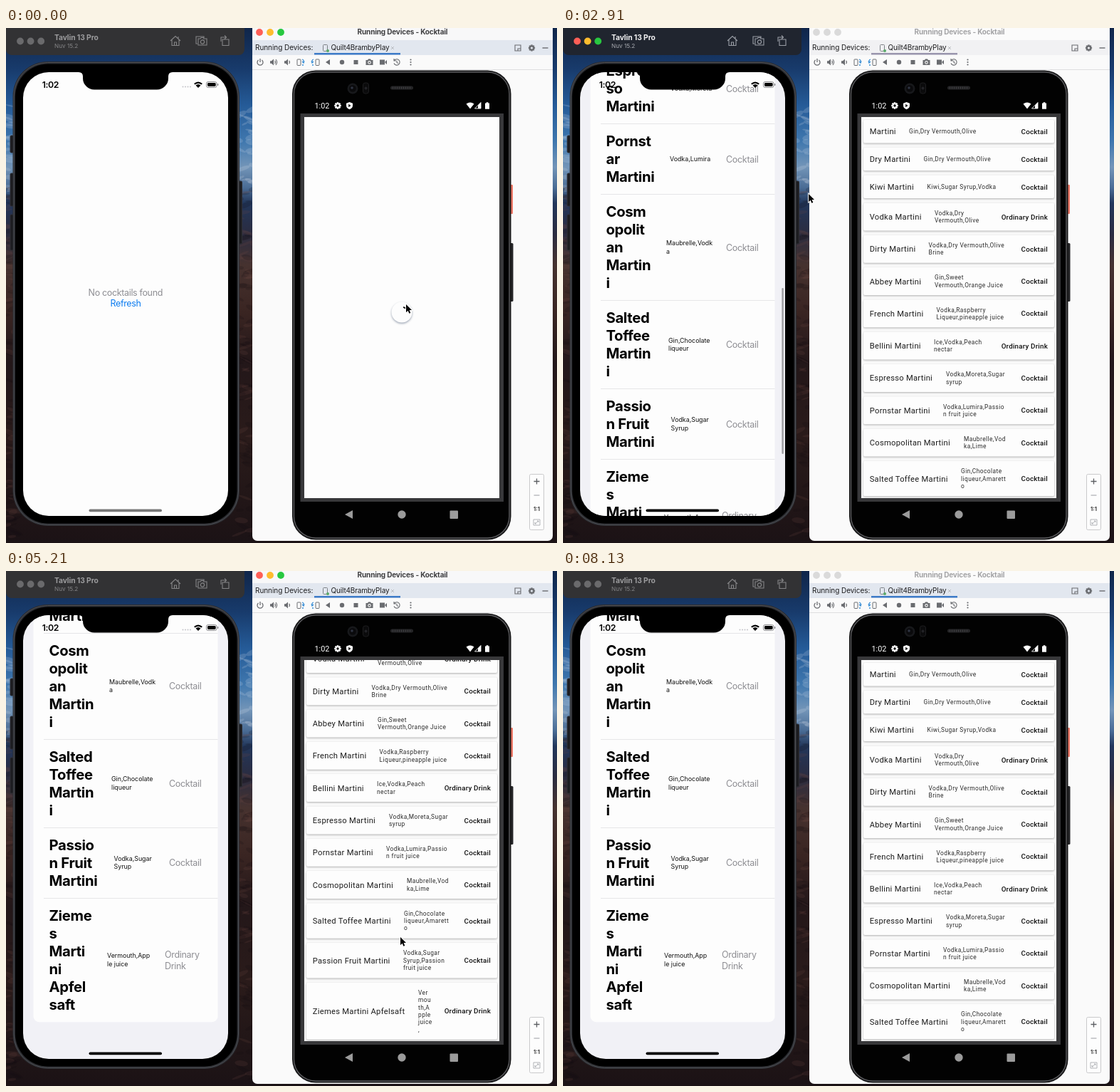
These frames come from a looping animation (774x723 px, 8.15 s). An HTML page with a canvas:

```html
<!DOCTYPE html>
<html lang="en">
<head>
<meta charset="utf-8">
<title>Cocktail lists on two phones</title>
<style>
html, body { margin: 0; width: 100%; height: 100%; overflow: hidden; background: #1c1418; }
canvas { display: block; }
</style>
</head>
<body>
<canvas id="stage" width="774" height="723"></canvas>
<script>
const W = 774, H = 723, LOOP = 8150, STEP = 208.4;
const ctx = document.getElementById('stage').getContext('2d');
const UI = 'Inter, "Liberation Sans", sans-serif';
const DROID = 'Roboto, "Liberation Sans", sans-serif';

// left name, left ingredients, x, right name, right ingredients, x, ordinary drink
const DRINKS = [
  ['Martin/i', 'Gin,Dry/Vermouth', 156, 'Martini', 'Gin,Dry Vermouth,Olive', 486],
  ['Dry/Martini', 'Gin,Dry/Vermouth', 158.5, 'Dry Martini', 'Gin,Dry Vermouth,Olive', 506.5],
  ['Kiwi/Martini', 'Kiwi,Sugar/Syrup', 156, 'Kiwi Martini', 'Kiwi,Sugar Syrup,Vodka', 511.5],
  ['Vodka/Martini', 'Vodka,Dry/Vermouth', 153, 'Vodka Martini', 'Vodka,Dry/Vermouth,Olive', 522, 1],
  ['Dirty/Martini', 'Vodka,Dry/Vermouth', 156, 'Dirty Martini', 'Vodka,Dry Vermouth,Olive/Brine', 513.5],
  ['Abbey/Martini', 'Gin,Sweet/Vermouth', 157, 'Abbey Martini', 'Gin,Sweet/Vermouth,Orange Juice', 522],
  ['Frenc/h/Martin/i', 'Vodka,Raspber/ry Liqueur', 146, 'French Martini', 'Vodka,Raspberry/Liqueur,pineapple juice', 524.5],
  ['Bellini/Martini', 'Ice,Vodka,/Peach nectar', 150, 'Bellini Martini', 'Ice,Vodka,Peach/nectar', 521, 1],
  ['Espres/so/Martini', 'Vodka,Moreta', 151, 'Espresso Martini', 'Vodka,Moreta,Sugar/syrup', 538],
  ['Pornst/ar/Martini', 'Vodka,Lumira', 150, 'Pornstar Martini', 'Vodka,Lumira,Passio/n fruit juice', 534],
  ['Cosm/opolit/an/Martin/i', 'Maubrelle,Vodk/a', 145, 'Cosmopolitan Martini', 'Maubrelle,Vod/ka,Lime', 563],
  ['Salted/Toffee/Martin/i', 'Gin,Chocolate/liqueur', 148, 'Salted Toffee Martini', 'Gin,Chocolate/liqueur,Amarett/o', 559],
  ['Passio/n Fruit/Martini', 'Vodka,Sugar/Syrup', 151.5, 'Passion Fruit Martini', 'Vodka,Sugar/Syrup,Passion/fruit juice', 558],
  ['Zieme/s/Marti/ni/Apfel/saft', 'Vermouth,App/le juice', 142, 'Ziemes Martini Apfelsaft', 'Ver/mou/th,A/pple/juice/,', 579, 1]
];

// Motion keys: [step, values...]
const POINTER = [[0, 562, 388], [1, 520, 392], [3, 290, 394], [5, 170, 384], [7, 172, 384],
  [9, 188, 455], [10, 188, 455], [11, 195, 340], [12, 235, 275], [14, 345, 233], [16, 470, 400],
  [18, 542, 506], [19, 545, 500], [21, 548, 370], [22, 550, 365], [24, 553, 500], [25, 554, 514],
  [26, 554, 516], [29, 558, 620], [31, 561, 664], [33, 561, 664], [36, 752, 518], [37, 800, 518]];
const LEFT_SCROLL = [[10, 0], [11, 120], [12, 390], [13, 620], [14, 786], [15, 865], [16, 905], [17, 925], [18, 933], [19, 932.4]];
const BAR = [[10, 95, 307], [12, 230, 250], [14, 365, 233], [18, 420, 232]];
const BAR_ALPHA = [[8, 0], [9, 1], [21, 1], [25, 0]];
const RIGHT_SCROLL = [[18, 0], [19, 8], [21, 125], [22, 141.5], [26, 141.5], [27, 124], [28, 84], [29, 38], [30, 8], [31, 0]];

function at(keys, s) {
  if (s <= keys[0][0]) return keys[0].slice(1);
  for (let i = 1; i < keys.length; i++) {
    const a = keys[i - 1], b = keys[i];
    if (s <= b[0]) {
      const k = (s - a[0]) / (b[0] - a[0]);
      return a.slice(1).map((v, j) => v + (b[j + 1] - v) * k);
    }
  }
  return keys[keys.length - 1].slice(1);
}

function rect(x, y, w, h, color) {
  ctx.fillStyle = color;
  ctx.fillRect(x, y, w, h);
}
function round(x, y, w, h, r, color, line, weight = 1) {
  ctx.beginPath();
  ctx.roundRect(x, y, w, h, r);
  if (color) { ctx.fillStyle = color; ctx.fill(); }
  if (line) { ctx.strokeStyle = line; ctx.lineWidth = weight; ctx.stroke(); }
}
function dot(x, y, r, color) {
  ctx.beginPath();
  ctx.arc(x, y, r, 0, 7);
  ctx.fillStyle = color;
  ctx.fill();
}
function text(s, x, y, font, color, gap = 0, align = 'left') {
  ctx.font = font;
  ctx.letterSpacing = gap + 'px';
  ctx.textAlign = align;
  ctx.fillStyle = color;
  ctx.fillText(s, x, y);
}
function lines(s, x, mid, lead, shift, font, color, gap) {
  const parts = s.split('/');
  parts.forEach((p, i) =>
    text(p, x, mid + (i - (parts.length - 1) / 2) * lead + shift, font, color, gap));
}
function icon(d, x, y, color, weight = 1.1) {
  ctx.save();
  ctx.translate(x, y);
  const p = new Path2D(d);
  if (weight) { ctx.strokeStyle = color; ctx.lineWidth = weight; ctx.stroke(p); }
  else { ctx.fillStyle = color; ctx.fill(p); }
  ctx.restore();
}
function clipped(x, y, w, h, r, draw) {
  ctx.save();
  ctx.beginPath();
  ctx.roundRect(x, y, w, h, r);
  ctx.clip();
  draw();
  ctx.restore();
}
function gradient(x0, y0, x1, y1, stops) {
  const g = ctx.createLinearGradient(x0, y0, x1, y1);
  stops.forEach(([p, c]) => g.addColorStop(p, c));
  return g;
}
function lights(x, y, gap, on, off) {
  ['#fe5f57', '#febc2e', '#28c840'].forEach((c, i) => dot(x + i * gap, y, 4.9, on ? c : off));
}

function wallpaper() {
  rect(0, 0, W, H, gradient(0, 0, 0, H, [
    [0, '#10264a'], [.08, '#183b6c'], [.15, '#255b98'], [.22, '#3f77ae'], [.27, '#7395b8'],
    [.31, '#4a6c95'], [.34, '#22365a'], [.4, '#2b2c40'], [.46, '#46322f'], [.55, '#3a2522'],
    [.65, '#231719'], [.8, '#2a1b1a'], [1, '#1b1215']]));
  let seed = 17;
  const rnd = () => (seed = seed * 16807 % 2147483647) / 2147483647;
  for (let i = 0; i < 200; i++) {
    const y = 110 + rnd() * 613, x = rnd() < .5 ? rnd() * 12 : 326 + rnd() * 22;
    const sky = y < 225;
    ctx.globalAlpha = .18;
    ctx.beginPath();
    ctx.ellipse(x, y, 4 + rnd() * 9, 1 + rnd() * 3, rnd() - .5, 0, 7);
    ctx.fillStyle = sky ? '#dbe6ef' : rnd() < .6 ? '#120c10' : '#704a40';
    ctx.fill();
  }
  ctx.globalAlpha = 1;
}

function leftBar(on) {
  round(0, -10, 335, 48, 8, on ? '#20252f' : '#323234');
  lights(20, 18.5, 14.6, on, '#6a6a6c');
  text('Tavlin 13 Pro', 68, 17, '700 10.3px ' + UI, on ? '#f1f1f2' : '#9c9c9e', -.1);
  text('Nuv 15.2', 68, 27.5, '400 8.2px ' + UI, on ? '#a8abb1' : '#858587');
  const c = on ? '#9a9ea6' : '#858587';
  icon('M-7 0L0-6.5L7 0M-5-1.5V6.5H5V-1.5M-1.5 6.5V2H1.5V6.5M4-6V-3', 238, 18, c);
  icon('M-5 4H-7V-6H4V-4M-4-3H-1L0-4.5H3L4-3H8V6H-4ZM4.6 1.5A2.6 2.6 0 1 1 -.6 1.5A2.6 2.6 0 1 1 4.6 1.5', 274, 18, c);
  icon('M-4-2H5V6.5H-4ZM-6 1V-5H1M-1-7.5L1.5-5L-1-2.5', 308, 18, c);
}

function leftList(s) {
  const [off] = at(LEFT_SCROLL, s);
  rect(24, 62, 288, 623, '#f1f1f6');
  const height = d => 23.6 + 25.1 * d[0].split('/').length;
  let y = 181 - off;
  round(38.5, y, 259, DRINKS.reduce((sum, d) => sum + height(d), 0), 8, '#fdfdfd');
  DRINKS.forEach((d, i) => {
    const h = height(d), mid = y + h / 2;
    if (y < 690 && y + h > 55) {
      if (i) rect(53, Math.round(y - .5), 244.5, 1, '#e6e6e8');
      lines(d[0], 60.5, mid, 25.1, 7.3, '700 20.3px ' + UI, '#000', -.35);
      lines(d[1], d[2], mid, 11.8, 3, '400 8.9px ' + UI, '#111', -.02);
      lines(d[6] ? 'Ordinary/Drink' : 'Cocktail', d[6] ? 223 : 229, mid, 15.7, 4.8,
        '400 12.5px ' + UI, '#8e8e93', -.3);
    }
    y += h;
  });
  const [top, len] = at(BAR, s);
  ctx.globalAlpha = at(BAR_ALPHA, s)[0];
  round(307.4, top, 2.4, len, 1.2, '#9b9b9f');
  ctx.globalAlpha = 1;
}

function leftPhone(s) {
  [[6, 151, 24], [6, 204, 46], [6, 262, 50], [327, 215, 88]].forEach(([x, y, h]) => round(x, y, 4.5, h, 1.5, '#1c1c20', '#2e2f34'));
  round(9.5, 47, 318.5, 652, 49, '#2b2c30');
  round(11, 48.5, 315.5, 649, 47.5, null, '#4d4f55');
  round(13, 50.5, 311.5, 645, 46, '#000');
  clipped(24, 62, 288, 623, 36, () => {
    if (s >= 7) leftList(s);
    else {
      rect(24, 62, 288, 623, '#fdfdfd');
      text('No cocktails found', 167.8, 375.5, '400 12.5px ' + UI, '#8e8e93', -.34, 'center');
      text('Refresh', 168, 390.5, '400 12.5px ' + UI, s === 5 ? '#b4d6fb' : '#0a7bf0', -.34, 'center');
    }
    text('1:02', 62.3, 84, '600 12.3px ' + UI, '#000', -.4, 'center');
    for (let i = 0; i < 4; i++) dot(248.5 + i * 3.5, 82.5, 1, '#c3c3c8');
    icon('M-6-2Q0-7 6-2L4.4-.4Q0-4 -4.4-.4ZM-3.5.6Q0-2.4 3.5.6L0 4Z', 270, 80, '#000', 0);
    round(281.5, 75.5, 14.5, 8, 2.4, null, '#8a8a8d');
    round(283, 77, 11.6, 5, 1.4, '#000');
    round(297, 78, 1.4, 3, .7, '#8a8a8d');
    round(116.5, 675.6, 102.5, 3.6, 1.8, s < 7 ? '#777' : '#000');
  });
  ctx.beginPath();
  ctx.moveTo(102, 60);
  ctx.lineTo(102, 62);
  ctx.quadraticCurveTo(108, 62, 108, 68);
  ctx.arcTo(108, 86.5, 125, 86.5, 16);
  ctx.arcTo(228, 86.5, 228, 70, 16);
  ctx.lineTo(228, 68);
  ctx.quadraticCurveTo(228, 62, 234, 62);
  ctx.lineTo(234, 60);
  ctx.fillStyle = '#000';
  ctx.fill();
}

function ide(active, tabOn) {
  round(346, -10, 422, 730, 7, '#fafafa');
  rect(346, 0, 422, 17, active ? '#f8f8f9' : '#fbfbfb');
  lights(356, 6, 15, active, '#dadada');
  text('Running Devices - Kocktail', 557, 9, '700 10px ' + UI, active ? '#3e3e40' : '#a3a3a5', -.16, 'center');
  const row = tabOn ? '#e2e7ef' : '#f1f1f3';
  rect(346, 17, 422, 21, row);
  text('Running Devices:', 350, 31.3, '400 10px ' + UI, '#1d1d1f', -.05);
  rect(433, 35, 121, 2.5, tabOn ? '#3d7bc8' : '#9995ad');
  round(445.5, 23.5, 6, 9, 1, null, '#7c8085');
  dot(452, 32, 2, '#59a869');
  text('Quilt4BrambyPlay', 456.5, 31.3, '400 10px ' + UI, '#1d1d1f', -.15);
  icon('M-2-2L2 2M2-2L-2 2', 543, 28, '#b4b7bc', .9);
  const c = '#6a6c70';
  icon('M-4-4H4V4H-4ZM0 4V1H4', 719, 28, c);
  gear(738.5, 28, 4.6, c, row);
  icon('M-4 0H4', 757.5, 28, c, 1.4);
  rect(346, 38, 422, 20, '#fafafa');
  rect(346, 58, 422, 1, '#dedee0');
  const y = 48;
  icon('M-2.4-3A4 4 0 1 0 2.4-3M0-5V0', 357, y, c, 1.3);
  const speaker = 'M-5-1.7H-3L0-4.5V4.5L-3 1.7H-5Z';
  icon(speaker, 376, y, c, 0);
  icon('M1.6-2.2Q3.4 0 1.6 2.2M3-4Q6.2 0 3 4', 376, y, c);
  icon(speaker, 396, y, c, 0);
  icon('M1.6-2.2Q3.4 0 1.6 2.2', 396, y, c);
  [[414, 1], [434, -1]].forEach(([x, k]) => {
    round(x - 2 - 3 * k, y - 4, 5, 8.5, .8, null, c);
    icon(`M${2 * k}-4Q${5 * k}-3 ${4 * k} 1L${2 * k}-1M${4 * k} 1L${5 * k}-1.5M${2 * k} 4H${4 * k}`, x, y, '#3a8fd6', 1.3);
  });
  icon('M3-4V4L-3 0Z', 452, y, c, 0);
  dot(472, y, 3.2, c);
  rect(488.5, y - 3, 6, 6, c);
  icon('M-5-3H-2.5L-1.5-4.5H1.5L2.5-3H5V4H-5Z', 510.5, y, c, 0);
  dot(510.5, 48.4, 2.3, '#fafafa');
  dot(510.5, 48.4, 1.2, c);
  icon('M-5-3.5H2V3.5H-5ZM2.5-.8L5-3V3L2.5.8Z', 530, y, c, 0);
  icon('M-3.5-2.6A4.2 4.2 0 1 1 -4 1.5M-4-5V-2H-1M0-2.3V.5L2 1.5', 549, y, c);
  [-3.5, 0, 3.5].forEach(d => dot(568.5, y + d, 1.1, c));
}

function zoomBox() {
  round(735.5, 626.5, 20, 78, 2, '#fdfdfd', '#c9c9cb');
  icon('M-4 0H4M0-4V4', 745.5, 636.5, '#5d5f63', 1.3);
  icon('M-4 0H4', 745.5, 656, '#aaacb0', 1.2);
  text('1:1', 745.5, 678, '700 7.5px ' + UI, '#333', 0, 'center');
  icon('M-4.5-4H4.5V4H-4.5ZM-2.5 2L2.5-2M-2.5 0V2H-.5M2.5 0V-2H.5', 745.5, 694, '#aaacb0', .9);
}

function gear(x, y, r, color, hole) {
  ctx.save();
  ctx.translate(x, y);
  ctx.fillStyle = color;
  for (let i = 0; i < 4; i++) {
    ctx.fillRect(-1.2, -r, 2.4, r * 2);
    ctx.rotate(Math.PI / 4);
  }
  ctx.restore();
  dot(x, y, r * .74, color);
  dot(x, y, r * .34, hole);
}

function rightList(off) {
  rect(419, 125, 274, 535, '#fcfcfc');
  let y = 126 - off;
  DRINKS.forEach(d => {
    const h = [38.8, 45.3, 55.7, 0, 0, 86.3][d[4].split('/').length - 1];
    const mid = y + h / 2;
    ctx.save();
    ctx.shadowColor = 'rgba(0,0,0,.32)';
    ctx.shadowBlur = 3;
    ctx.shadowOffsetY = 1;
    round(422, y + 3, 268, h - 6.3, 2, '#fdfdfd');
    ctx.restore();
    text(d[3], 430.7, mid + 3.9, '400 11.2px ' + DROID, '#1c1c1c', .28);
    lines(d[4], d[5], mid, 10.4, 2.9, '400 8.4px ' + DROID, '#2b2b2b', .44);
    text(d[6] ? 'Ordinary Drink' : 'Cocktail', 681, mid + 3.5, '500 9.8px ' + DROID, '#111', .2, 'right');
    y += h;
  });
}

function spinner() {
  rect(419, 125, 274, 535, '#fdfdfd');
  ctx.save();
  ctx.shadowColor = 'rgba(40,60,90,.45)';
  ctx.shadowBlur = 3;
  ctx.shadowOffsetY = 1.5;
  dot(556, 399, 14.5, '#fdfdfd');
  ctx.restore();
  ctx.beginPath();
  ctx.arc(556, 399, 7.5, -1.3, -.8);
  ctx.strokeStyle = '#111';
  ctx.lineWidth = 1.8;
  ctx.stroke();
}

function rightPhone(s) {
  round(707, 220, 5, 41, 1, '#ee7765');
  round(707, 302, 5.5, 82, 1.5, '#242426');
  round(402, 59.5, 307.5, 659, 33, '#161617');
  round(404.5, 62, 302.5, 654, 30.5, '#020202', '#5c5c5f', 1.4);
  dot(487, 85, 7.5, '#17181b');
  dot(487, 85, 4.8, '#0a0a0c');
  dot(486, 84, 1.8, '#2f3442');
  round(501.5, 77, 8, 15, 3, '#0b0b0c', '#1d1d1f');
  dot(505.5, 84.5, 2, '#222226');
  round(540, 81.5, 32, 5, 2.5, '#252527');
  for (let x = 543; x < 570; x += 3) rect(x, 82.5, 1, 3, '#3d3d40');

  text('1:02', 433.5, 113, '400 10.8px ' + DROID, '#fff');
  gear(466, 109, 4.8, '#fff', '#000');
  icon('M0-5L4.5-3.3V0Q4.5 3.5 0 5.3Q-4.5 3.5 -4.5 0V-3.3Z', 482.5, 109, '#fff', 0);
  icon('M-1.3-2.2L2 0L-1.3 2.2Z', 482.5, 109, '#000', 0);
  icon('M-5.5-2.5Q0-6.5 5.5-2.5L0 4.5Z', 652, 109, '#fff', 0);
  icon('M4-4.5V4H-4.5Z', 663, 109, '#fff', .9);
  icon('M4-4.5V4H0V-.5Z', 663, 109, '#fff', 0);
  icon('M-3-3.5H-1.3V-4.8H1.3V-3.5H3V4.7H-3Z', 676, 109, '#fff', 0);

  rect(413.5, 120, 285.5, 545, '#38383a');
  clipped(419, 125, 274, 535, 0, () => s < 2 ? spinner() : rightList(at(RIGHT_SCROLL, s)[0]));
  icon('M5-6V6L-6 0Z', 482, 683, '#9b9b9b', 0);
  dot(556, 683, 5.7, '#9b9b9b');
  round(623.5, 677.5, 11.5, 11.5, 1, '#9b9b9b');
}

function pointer(s) {
  const [x, y] = at(POINTER, s);
  const arrow = 'M0 0V11.2L2.6 8.8L4.4 12.8L6.3 12L4.6 8.1H8Z';
  icon(arrow, x, y, '#fff', 1.8);
  icon(arrow, x, y, '#000', 0);
}

function paint(s) {
  const leftOn = s >= 5 && s < 16;
  ctx.drawImage(backdrop, 0, 0);
  leftBar(leftOn);
  leftPhone(s);
  ide(!leftOn && s < 37, !leftOn);
  rightPhone(s);
  zoomBox();
  pointer(s);
}

wallpaper();
const backdrop = document.createElement('canvas');
backdrop.width = W;
backdrop.height = H;
backdrop.getContext('2d').drawImage(ctx.canvas, 0, 0);

const start = performance.now();
function frame() {
  const t = (performance.now() - start) % LOOP;
  const step = Math.floor((t + 8) / STEP);
  paint(step === 33 ? 32 : step);
  requestAnimationFrame(frame);
}
frame();
</script>
</body>
</html>
```
